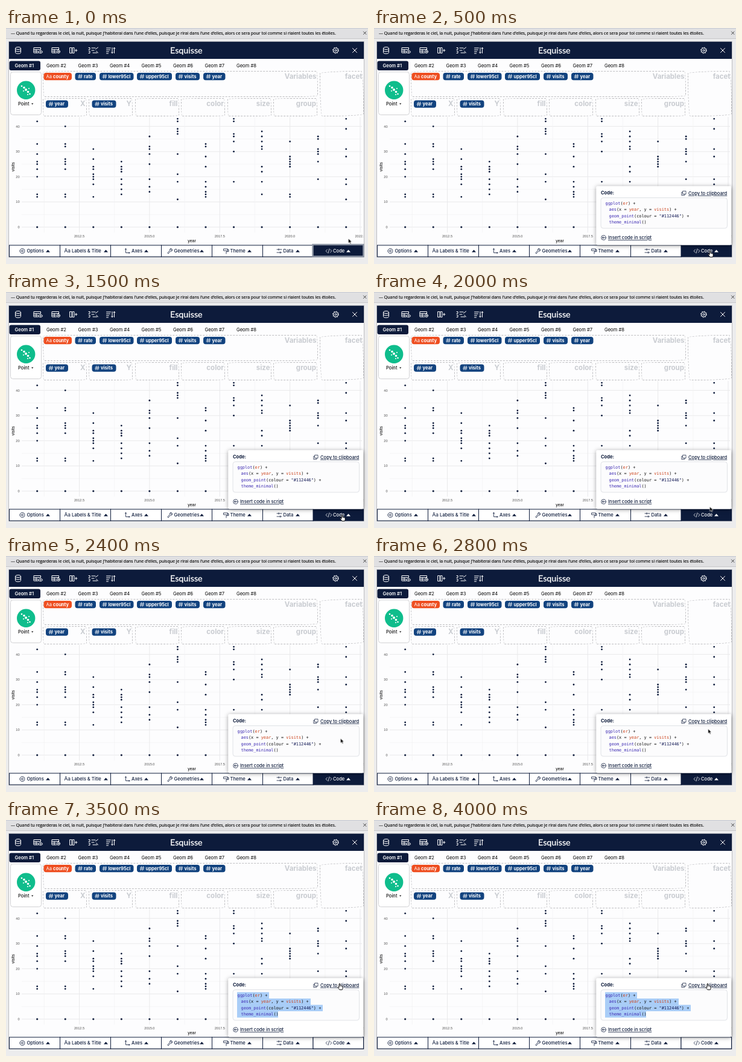
An HTML page for the animation above (4.1 s loop, 600 px wide and 390 px high).

```html
<!DOCTYPE html>
<html lang="en">
<head>
<meta charset="utf-8">
<title>Esquisse</title>
<style>
html, body { margin: 0; width: 600px; height: 390px; overflow: hidden; background: #e9e9ea; }
body { position: relative; }
svg { position: absolute; left: 0; top: 0; display: block; }
text { font: 500 7.6px Inter, sans-serif; fill: #0d1b3b; white-space: pre; }
.quote { font: 7.03px "Open Sans", sans-serif; fill: #000; stroke: #000; stroke-width: .15px; }
.brand { font: 14.3px Lato, cursive; fill: #fff; stroke: #fff; stroke-width: .3px; }
.tab { font-weight: 400; fill: #000; }
.on { font-weight: 600; fill: #fff; }
.tag { font-weight: 700; fill: #fff; }
.zone-name { font-weight: 700; font-size: 11.5px; fill: #c9ccd1; text-anchor: end; }
.tick { font: 5.6px "Liberation Sans", sans-serif; fill: #4d4d4d; }
.axis { font: 7px "Liberation Sans", sans-serif; fill: #000; text-anchor: middle; }
.mid { text-anchor: middle; }
.end { text-anchor: end; }
.link { text-decoration: underline; }
.code text { font: 6.9px "DejaVu Sans Mono", monospace; fill: #111; }
.code .fn { fill: #3d2bb3; }
.code .var { fill: #cc421a; }
.code .str { fill: #0b1250; }
.line { fill: none; stroke: currentColor; stroke-linecap: round; stroke-linejoin: round; }
.zone {
  position: absolute; box-sizing: border-box; border: 1px dashed #bdbdc0;
  border-radius: 115px 7px 101px 7px / 7px 101px 7px 115px;
}
.popup, .picked, .idle, .ring, .arrow, .hand, .cursor { animation: 4.1s infinite step-end; }
.popup { animation-name: popup; }
.picked, .idle { animation-name: picked; }
.ring { animation-name: ring; }
.hand { animation-name: hand; }
.arrow { animation-name: arrow; }
.cursor { animation-name: move; }
@keyframes popup { 0% { opacity: 0 } 9.75%, 100% { opacity: 1 } }
@keyframes picked { 0% { opacity: 0 } 82.9%, 100% { opacity: 1 } }
@keyframes ring { 0% { opacity: 1 } 7.3%, 100% { opacity: 0 } }
@keyframes hand { 0% { opacity: 0 } 7.3% { opacity: 1 } 48.75% { opacity: 0 } 73.15%, 100% { opacity: 1 } }
@keyframes arrow { 0% { opacity: 1 } 7.3% { opacity: 0 } 48.75% { opacity: 1 } 73.15%, 100% { opacity: 0 } }
@keyframes move {
  0% { transform: translate(567.5px, 348px); animation-timing-function: steps(4, end); }
  9.75%, 46.3% { transform: translate(557px, 368px); animation-timing-function: steps(5, end); }
  58.5%, 60.9% { transform: translate(554.5px, 301.5px); animation-timing-function: steps(6, end); }
  75.6%, 100% { transform: translate(553px, 270px); }
}
</style>
</head>
<body>
<svg id="stage" width="600" height="390" viewBox="0 0 600 390">
  <defs>
    <clipPath id="panel"><rect x="5" y="51" width="588" height="327"/></clipPath>
    <filter id="soft" x="-10%" y="-15%" width="120%" height="130%">
      <feDropShadow dx="0" dy="1" stdDeviation="3.5" flood-opacity=".4"/>
    </filter>
  </defs>

  <rect width="600" height="17" fill="#e0e0e2"/>
  <rect width="600" height="1" fill="#c6cad2"/>
  <path d="M0 17.500H600" stroke="#c8c8ca"/>
  <rect y="18" width="600" height="372" fill="#ececed"/>
  <text class="quote" x="8" y="11">— Quand tu regarderas le ciel, la nuit, puisque j'habiterai dans l'une d'elles, puisque je rirai dans l'une d'elles, alors ce sera pour toi comme si riaient toutes les étoiles.</text>
  <path class="line" color="#444" d="M592.500 6l4.500 4.500m0-4.500l-4.500 4.500"/>

  <rect x="4.500" y="22.500" width="589" height="356" fill="#fdfdfe" stroke="#bcbcbf"/>
  <rect x="5" y="22.700" width="588" height="28.300" fill="#0d1b3b"/>
  <text class="brand" x="272" y="42">Esquisse</text>

  <g class="line" color="#fff" stroke-width="1">
    <ellipse cx="20" cy="33.500" rx="4.500" ry="2"/>
    <path d="M15.500 33.500v7c0 2.600 9 2.600 9 0v-7M15.500 37c0 2.600 9 2.600 9 0"/>
    <path id="grid" d="M54 41h-8v-8.500h11.500v3M46 35.500h11.500M46 38.200h7M50 35.500v5.500"/>
    <use href="#grid" x="30"/>
    <path d="M53.500 39.500q3.500-4.500 7.500 0q-4 4.500-7.500 0z"/>
    <circle cx="57.200" cy="39.500" r=".6"/>
    <circle cx="87" cy="39" r="2.500"/><circle cx="87" cy="39" r=".7"/>
    <path d="M106 32.500h3v9h-3zM110.500 32.500h2.500v9h-2.500zM114.500 37h3.500M116.200 35.200v3.600"/>
    <path d="M142 33h6M142 37h4M144 41h7M148.500 35l4-3M149.500 38l3 3M137 32.500h2v3h-2M137 38h2v3.500h-2"/>
    <path d="M166.500 33h7M166.500 36h6M166.500 39h4M166.500 42h3M176 32.500v9M174.500 40l1.500 1.800 1.500-1.800M179.500 41.500v-9M178 34l1.500-1.800 1.500 1.800"/>
    <circle cx="546.500" cy="37" r="4" stroke-width="1.100"/><circle cx="546.500" cy="37" r="1.500"/>
    <circle cx="546.500" cy="37" r="5" stroke-dasharray="1.500 2.427" stroke-linecap="butt"/>
    <path d="M574.500 33.500l7 7m0-7l-7 7"/>
  </g>

  <rect x="7.500" y="72.500" width="51" height="71" rx="4" fill="#fff" stroke="#d2d2d4"/>
  <circle cx="33.200" cy="102.700" r="15.200" fill="#0fbd8c"/>
  <g fill="#fff">
    <circle cx="26" cy="96" r="1.300"/><circle cx="30" cy="98.500" r="1.800"/><circle cx="33" cy="102" r="2"/>
    <circle cx="36.500" cy="105.500" r="1.800"/><circle cx="39.500" cy="109" r="1.300"/>
    <circle cx="36" cy="110" r="1"/><circle cx="29" cy="104" r="1"/><circle cx="38" cy="100" r="1"/>
  </g>
  <text x="20" y="128" style="fill:#111">Point</text>
  <path d="M42 124.500h3.400l-1.700 2z" fill="#111"/>

  <g id="tabs"></g>
  <g id="zones"></g>
  <g id="tags"></g>
  <g id="plot" clip-path="url(#panel)"></g>
  <g id="bar"></g>

  <g class="popup">
    <rect x="368.500" y="261.500" width="223.500" height="97" rx="2" fill="#fff" filter="url(#soft)"/>
    <text x="376" y="275" style="font-weight:700">Code:</text>
    <path class="line" color="#0d1b3b" stroke-width=".7" d="M512 269.500h5v5h-5zM511.500 271.500h-1.700v5h5v-1.700"/>
    <text class="link" x="521" y="275.800">Copy to clipboard</text>
    <rect x="376" y="280.500" width="209.500" height="50.500" rx="4" fill="#fcfcfd" stroke="#d9dbe0" stroke-width=".8"/>
    <path class="picked" fill="#a9cdf7" d="M383 284.500h53v10.500h69v10.500h20v10.500h-74v10.500h-68z"/>
    <g class="code">
      <text x="383.500" y="292"><tspan class="fn">ggplot</tspan>(<tspan class="var">er</tspan>) +</text>
      <text x="389.500" y="302.300"><tspan class="fn">aes</tspan>(x = <tspan class="var">year</tspan>, y = <tspan class="var">visits</tspan>) +</text>
      <text x="389.500" y="312.600"><tspan class="fn">geom_point</tspan>(colour = <tspan class="str">"#112446"</tspan>) +</text>
      <text x="389.500" y="322.900"><tspan class="fn">theme_minimal</tspan>()</text>
    </g>
    <g class="line" color="#0d1b3b" stroke-width=".8">
      <circle cx="380.500" cy="346.500" r="3.800"/>
      <path d="M382.500 346.500h-4m1.700-1.700l-1.700 1.700 1.700 1.700"/>
    </g>
    <text class="link" x="388" y="349.300">Insert code in script</text>
  </g>

  <g class="cursor">
    <path class="arrow" d="M0 0v7.600l1.800-1.600 1.200 2.800 1.400-.6-1.200-2.700h2.400z" fill="#000" stroke="#fff" stroke-width=".6"/>
    <path class="hand" d="M-.9 .9q.9-1.300 1.800 0v3.400q.9-.8 1.600 .1 1-.5 1.500 .5 1.100-.2 1.100 1v2.500l-.9 2.200h-4.200l-3.100-4.100q0-1.500 2.200 .1z" fill="#fff" stroke="#000" stroke-width=".9" stroke-linejoin="round"/>
  </g>
</svg>
<script>
const $ = id => document.getElementById(id);
const NAVY = '#0d1b3b';

function add(parent, tag, attrs, text) {
  const node = document.createElementNS('http://www.w3.org/2000/svg', tag);
  for (const key in attrs) node.setAttribute(key, attrs[key]);
  if (text !== undefined) node.textContent = text;
  parent.appendChild(node);
  return node;
}
const label = (parent, x, y, text, cls, more) => add(parent, 'text', { x, y, class: cls, ...more }, text);

// Geom tabs
add($('tabs'), 'rect', { x: 5.5, y: 54.5, width: 51.5, height: 15.5, rx: 3, fill: NAVY });
for (let i = 0; i < 8; i++)
  label($('tabs'), 14.5 + 52.5 * i, 65, 'Geom #' + (i + 1), i ? 'tab' : 'on');

// Drop zones
function zone(x, y, w, h, name) {
  const box = document.createElement('div');
  box.className = 'zone';
  box.style.cssText = `left:${x}px;top:${y}px;width:${w}px;height:${h}px`;
  document.body.appendChild(box);
  label($('zones'), x + w - 2, y + 13, name, 'zone-name');
}
zone(60.5, 70.5, 456, 43, 'Variables');
zone(519.5, 71, 73, 75, 'facet');
['X', 'Y', 'fill', 'color', 'size', 'group'].forEach((name, i) => zone(60.5 + 76.5 * i, 116, 73, 30, name));

// Variable tags
function tag(x, y, w, name, color = '#12437f') {
  const g = $('tags');
  add(g, 'rect', { x, y, width: w, height: 12.2, rx: 4, fill: color });
  if (name === 'county') label(g, x + 4, y + 8.7, 'Aa', 'tag', { style: 'font-weight:400' });
  else add(g, 'path', {
    class: 'line', color: '#fff', 'stroke-width': .8,
    d: `M${x + 7.5} ${y + 2.7}l-1 6.600m4-6.600l-1 6.600m-4-4.400h6.500m-7 2.300h6.500`
  });
  label(g, x + (name === 'county' ? 15.5 : 14.5), y + 8.7, name, 'tag');
}
tag(62.5, 74, 46.5, 'county', '#ee4e20');
[[114.5, 34.5, 'rate'], [155, 56.5, 'lower95cl'], [217, 58, 'upper95cl'], [281, 40, 'visits'], [327, 36.5, 'year']]
  .forEach(([x, w, name]) => tag(x, 74, w, name));
tag(66, 119.5, 37, 'year');
tag(142.5, 119.5, 40, 'visits');

// Scatter plot
const px = year => 121.5 + (year - 2012.5) * 46.55;
const py = v => 329 - v * 4.16;
const visits = [
  [42, 33, 29, 26, 25, 23, 20, 13, 12],
  [40, 33, 32, 27, 26, 25, 23, 13, 12],
  [31, 27, 24, 23, 21, 20, 19, 17, 12],
  [26, 24, 23, 22, 19, 17, 15, 13],
  [36, 32, 31, 29, 25, 19, 16, 14],
  [43, 42, 39, 38, 37, 29, 21, 18, 11],
  [33, 32, 28, 24, 18, 16, 14, 13, 12],
  [43, 42, 37, 36, 34, 30, 18],
  [38, 36, 34, 32, 31, 24, 22, 18, 13],
  [34, 28, 27, 26, 25, 24, 13, 12],
  [36, 35, 31, 30, 29, 26, 19],
  [43, 39, 31, 28, 19, 17, 11]
];
const plot = $('plot');
const rule = (d, major) => add(plot, 'path', { d, stroke: major ? '#e9e9eb' : '#f3f3f4', 'stroke-width': major ? 1 : .7 });
for (let v = 0; v <= 40; v += 5) {
  rule(`M26 ${py(v)}H590`, v % 10 === 0);
  if (v % 10 === 0) label(plot, 22.5, py(v) + 2, v, 'tick end');
}
for (let i = 0; i < 10; i++) {
  const year = 2011.25 + 1.25 * i;
  rule(`M${px(year)} 147V338`, i % 2);
  if (i % 2) label(plot, px(year), 346, year.toFixed(1), 'tick mid');
}
visits.forEach((column, i) => [...column, 0].forEach(v =>
  add(plot, 'circle', { cx: px(2011 + i), cy: py(v), r: v ? 1.4 : 1.6, fill: NAVY })));
label(plot, 308, 353.5, 'year', 'axis');
label(plot, 0, 0, 'visits', 'axis', { transform: 'translate(13.5 229.5) rotate(-90)' });

// Bottom buttons
const bar = $('bar');
const icons = {
  Options: 'M23 368.500a4 4 0 1 0 8 0a4 4 0 1 0-8 0M25.500 368.500a1.500 1.500 0 1 0 3 0a1.500 1.500 0 1 0-3 0',
  Axes: 'M198.500 364.500v7h6.500M197.300 366l1.200-1.500 1.200 1.500M203.700 370.200l1.300 1.300-1.300 1.300',
  Geometries: 'M268 371.500l3.500-4a2.100 2.100 0 0 1 2.800-2.800l-1.400 1.600 1 1 1.600-1.400a2.100 2.100 0 0 1-2.800 2.800l-3.500 4z',
  Theme: 'M361 365h6.500v3h-6.500zM367.500 366.500h1.500v3h-4v3.500',
  Data: 'M449 366h8M449 371h8M452 364.800v2.400M454.500 369.800v2.400',
  Code: 'M532.500 366l-2.300 2.500 2.300 2.500M537.500 366l2.300 2.500-2.300 2.500M536 365l-2 7'
};
function button(parent, x, w, name, tx, caret, fill, ink) {
  add(parent, 'rect', { x, y: 359, width: w, height: 19, fill, stroke: NAVY });
  if (icons[name]) add(parent, 'path', { class: 'line', color: ink, 'stroke-width': .8, d: icons[name] });
  else label(parent, 96.5, 371.3, 'Aa', '', { style: 'font-size:8.4px;font-weight:400' });
  label(parent, tx, 371.3, name, '', { style: `fill:${ink}` });
  add(parent, 'path', { d: `M${caret} 370.500h7l-3.500-4z`, fill: ink });
}
[['Options', 34.5, 66], ['Labels & Title', 109, 162], ['Axes', 208, 229], ['Geometries', 278.5, 321],
 ['Theme', 371.5, 400], ['Data', 459.5, 480]]
  .forEach(([name, tx, caret], i) => button(bar, 5.5 + 84 * i, 84, name, tx, caret, '#fff', NAVY));
button(bar, 509, 83.5, 'Code', 542, 564, NAVY, '#fff');
add(bar, 'rect', { class: 'ring', x: 508.5, y: 358, width: 84, height: 19.5, fill: 'none', stroke: '#8d95a4', 'stroke-width': 2.5 });
button(add(bar, 'g', { class: 'idle' }), 509, 83.5, 'Code', 542, 564, '#fff', NAVY);
</script>
</body>
</html>
```
